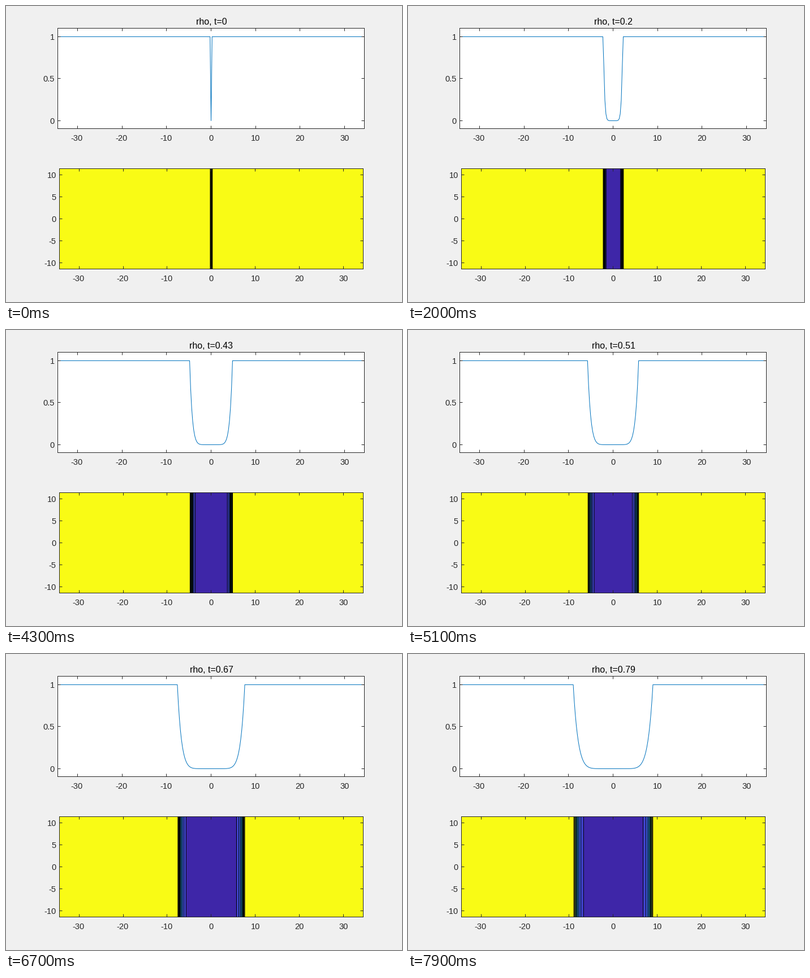
A matplotlib script that plays this animation: 700 by 525 pixels, repeating every 8 s.

```python
import numpy as np
import matplotlib.pyplot as plt
from matplotlib.animation import FuncAnimation
from matplotlib.colors import LinearSegmentedColormap
from matplotlib.patches import Rectangle
from matplotlib.transforms import ScaledTranslation

W, H, DPI = 700, 525, 100
PX = 72 / DPI              # points per pixel
FRAMES, INTERVAL = 80, 100
HALF, NODES = 34.44, 150   # half width of the domain, nodes on each side
POWER = 8.2
LEVELS = np.arange(1, 11) / 10
INK = "#262626"

plt.rcParams["font.family"] = "Liberation Sans"

cmap = LinearSegmentedColormap.from_list("fill", [
    (0, "#3e26a8"), (0.2, "#4563fc"), (0.45, "#1caadf"),
    (0.65, "#5acb73"), (0.9, "#fec834"), (1, "#f9fb15")])

half_x = np.linspace(0, HALF, NODES + 1)
full_x = np.concatenate([-half_x[:0:-1], half_x])


def density(k):
    """Right half of the profile: a power law behind a steadily moving front."""
    front = max((k - 1) / 2, 0.5)
    return np.minimum(1, (np.arange(NODES + 1) / front) ** POWER)


fig = plt.figure(figsize=(W / DPI, H / DPI), dpi=DPI, facecolor="#f0f0f0")
half_pixel = ScaledTranslation(0.5 / DPI, -0.5 / DPI, fig.dpi_scale_trans)


def label(x, y, text, size=14.67, ha="center", color=INK):
    return fig.text(x / W, 1 - y / H, text, fontsize=size * PX, ha=ha,
                    va="baseline", color=color)


def panel(left, top, right, bottom, ylim, yticks, face):
    ax = fig.add_axes([left / W, 1 - bottom / H,
                       (right - left) / W, (bottom - top) / H], facecolor=face)
    ax.set_xlim(-HALF, HALF)
    ax.set_ylim(*ylim)
    xticks = range(-30, 31, 10)
    ax.set_xticks(xticks)
    ax.set_yticks(yticks)
    ax.set_axisbelow(False)
    ax.tick_params(direction="in", length=5 * PX, width=PX, color=INK,
                   top=True, right=True, labelbottom=False, labelleft=False)
    for spine in ax.spines.values():
        spine.set(linewidth=PX, color=INK)
    for v in xticks:
        x = left + (v + HALF) / (2 * HALF) * (right - left)
        label(x + (0.5 if v >= 0 else -0.5), bottom + 22, f"{v}")
    for v in yticks:
        y = bottom - (v - ylim[0]) / (ylim[1] - ylim[0]) * (bottom - top)
        label(left - 5.2, y + 6, f"{v:g}", ha="right")
    return ax


top_ax = panel(91, 39, 633, 217, (-0.0943, 1.1003), (0, 0.5, 1), "white")
map_ax = panel(93.95, 288, 630.95, 466, (-11.44, 11.44),
               range(-10, 11, 5), cmap(1.0))

title = label(363, 33, "", size=16, color="black")
curve, = top_ax.plot([], [], color="#0072bd", linewidth=PX,
                     transform=top_ax.transData + half_pixel)

# nested bands, widest first, each filled with the colour just below its level
bands = []
for level in LEVELS[::-1]:
    band = Rectangle((0, -13), 0, 26, facecolor=cmap(level - 0.1),
                     edgecolor="black", linewidth=PX, snap=False,
                     transform=map_ax.transData + half_pixel)
    bands.append(map_ax.add_patch(band))


def draw(k):
    rho = density(k)
    title.set_text(f"rho, t={k / 100:g}")
    curve.set_data(full_x, np.concatenate([rho[:0:-1], rho]))
    end = np.argmax(rho >= 1) + 1
    for band, level in zip(bands, LEVELS[::-1]):
        edge = np.interp(level, rho[:end], half_x[:end])
        band.set_x(-edge)
        band.set_width(2 * edge)
    return [title, curve, *bands]


anim = FuncAnimation(fig, draw, frames=FRAMES, interval=INTERVAL,
                     repeat=True, repeat_delay=0, blit=False)
plt.show()
```
